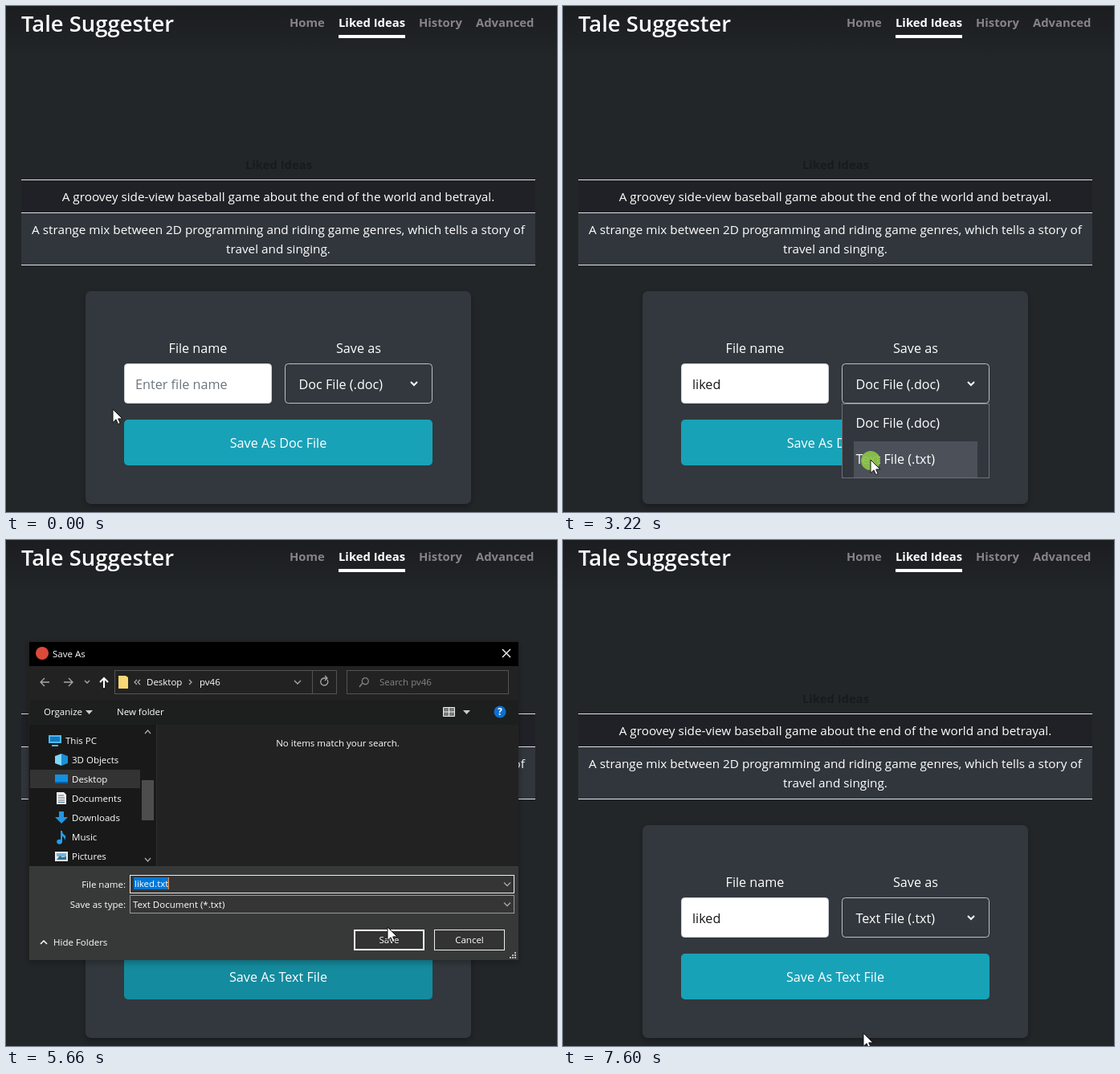
Write an HTML page that moves like this. It is 686 px wide and 630 px high and loops after 8.5 s.

```html
<!DOCTYPE html>
<html lang="en">
<head>
<meta charset="utf-8">
<title>Save liked ideas</title>
<style>
  html, body { margin: 0; width: 100%; height: 100%; overflow: hidden; background: #222629; }
  svg { display: block; width: 100%; height: 100%; }
  text { font: 15.3px "Open Sans", "Noto Sans", sans-serif; fill: #fff; white-space: pre; }
  .mid { text-anchor: middle; }
  .bold { font-size: 14.8px; font-weight: 700; }
  .nav { fill: #87828b; }
  .form { font-size: 16.2px; }
  #dialog text { font-size: 11.5px; }
  #dialog .dim { fill: #858585; }
  .line { fill: none; stroke: #fff; stroke-width: 2; }
  .thin { fill: none; stroke: #a8a8a8; stroke-width: 1.3; }
  .box { fill: none; stroke: #535353; }
</style>
</head>
<body>
<svg viewBox="0 0 686 630">
  <defs>
    <linearGradient id="head" x2="0" y2="1">
      <stop stop-color="#1b1d20"/><stop offset="1" stop-color="#222629"/>
    </linearGradient>
    <filter id="soft" x="-10%" y="-10%" width="120%" height="120%">
      <feDropShadow dx="0" dy="3" stdDeviation="4" flood-opacity=".3"/>
    </filter>
  </defs>

  <rect width="686" height="630" fill="#222629"/>
  <rect width="686" height="66" fill="url(#head)"/>
  <text x="19" y="32" style="font-size:27.4px;font-weight:600">Tale Suggester</text>
  <text class="bold nav" x="353" y="26">Home</text>
  <text class="bold" x="414" y="26">Liked Ideas</text>
  <text class="bold nav" x="514" y="26">History</text>
  <text class="bold nav" x="585" y="26">Advanced</text>
  <rect x="414" y="36" width="83" height="4" fill="#fff"/>

  <text class="bold mid" x="339.5" y="203" style="fill:#181b1e">Liked Ideas</text>
  <rect x="19" y="217" width="640" height="40" fill="#202126"/>
  <rect x="19" y="258" width="640" height="64" fill="#31363c"/>
  <path d="M19 216.5h640M19 257.5h640M19 322.5h640" stroke="#dee2e6"/>
  <text class="mid" x="339" y="243">A groovey side-view baseball game about the end of the world and betrayal.</text>
  <text class="mid" x="339" y="284">A strange mix between 2D programming and riding game genres, which tells a story of</text>
  <text class="mid" x="339" y="308">travel and singing.</text>

  <rect x="99" y="355" width="480" height="265" rx="7" fill="#32373d" filter="url(#soft)"/>
  <text class="mid form" x="239" y="432">File name</text>
  <text class="mid form" x="439" y="432">Save as</text>
  <rect x="147.5" y="445.5" width="183" height="49" rx="4" fill="#fff" stroke="#ced4da"/>
  <text id="name" class="form" x="161" y="477"></text>
  <rect id="caret" y="459" width="1" height="22" fill="#111"/>
  <rect x="347.5" y="445.5" width="183" height="49" rx="4" fill="none" stroke="#bcbfc3"/>
  <text id="kind" class="form" x="364.5" y="477"></text>
  <path class="line" d="M504 468l4 4 4-4"/>
  <rect id="button" x="147" y="515" width="384" height="57" rx="5"/>
  <text id="label" class="mid form" x="339" y="550"></text>

  <g id="popup">
    <rect x="347.5" y="495.5" width="183" height="92" fill="#32373d" stroke="#6b7078"/>
    <rect id="mark" x="362" width="154" height="45" fill="#4b5059"/>
    <text class="form" x="364.5" y="525">Doc File (.doc)</text>
    <text class="form" x="364.5" y="570">Text File (.txt)</text>
  </g>

  <g id="dialog">
    <rect x="28" y="126" width="610" height="397" fill="#202121" filter="url(#soft)"/>
    <rect x="29" y="127" width="609" height="30" fill="#000"/>
    <circle cx="45" cy="141" r="8" fill="#db4a3a"/>
    <text x="58" y="146">Save As</text>
    <path class="line" style="stroke-width:1.3" d="M618 136l10 10m0-10l-10 10"/>

    <path class="thin" d="M54 177H43m5-5l-5 5 5 5M72 177h11m-5-5l5 5-5 5M98 175l3 3 3-3M359 175l4 4 4-4"/>
    <path class="line" d="M122 184v-12m-5 5l5-5 5 5"/>
    <rect class="box" x="135.5" y="162.5" width="276" height="29"/>
    <path class="box" d="M381.5 163v28"/>
    <path d="M140 169h9l3 2v14h-12z" fill="#f8d775"/>
    <path class="thin" d="M163 174l-3 3 3 3m4-6l-3 3 3 3M228 174l3 3-3 3M400 174a4.5 4.5 0 1 1-4-2h3m-2-3l3 3-3 3"/>
    <text x="175" y="181">Desktop</text>
    <text x="241" y="181">pv46</text>
    <rect class="box" x="424.5" y="162.5" width="201" height="29"/>
    <path class="thin" style="stroke:#858585" d="M440 183l4-5a4 4 0 1 1 2 1.5l-2-1.5"/>
    <text class="dim" x="465" y="181">Search pv46</text>

    <rect x="29" y="199" width="609" height="31" fill="#1d1f1f"/>
    <g id="tools">
      <text x="47" y="218">Organize</text>
      <text x="138" y="218">New folder</text>
      <path d="M99 212h9l-4.5 5zM569 212h9l-4.5 5z" fill="#ccc"/>
      <path d="M544.5 208.5h14v11h-14zM551.5 208v12M544 214h15" fill="#777" stroke="#eee"/>
    </g>
    <circle cx="615" cy="214" r="7.5" fill="#0f6fd0"/>
    <text class="mid" x="615" y="218" style="font-weight:700">?</text>

    <rect x="29" y="230" width="158" height="176" fill="#191919"/>
    <path d="M187.5 230v176" stroke="#2d2d2d"/>
    <rect x="30" y="286" width="137" height="23" fill="#333"/>
    <rect x="169" y="299" width="15" height="50" fill="#4d4d4d"/>
    <path class="thin" d="M173 241l3.5-4 3.5 4M173 396l3.5 4 3.5-4"/>
    <g id="places"></g>
    <path d="M53 243h16v10H53zM57 255h8v2h-8z" fill="#4fb9ee"/>
    <path d="M55 245h12v6H55z" fill="#1679c4"/>
    <path d="M61 269l8-3v15l-8-3z" fill="#7fd6f5"/>
    <path d="M69 266l8 3v9l-8 3z" fill="#1c8fd6"/>
    <path d="M61 292h16v11H61z" fill="#1490e0"/>
    <path d="M61 301h16v2H61z" fill="#0b5ea8"/>
    <path d="M63 314h9l3 3v12H63z" fill="#eee"/>
    <path d="M65 318h7m-7 3h8m-8 3h8m-8 2.5h8" stroke="#58748c"/>
    <path d="M66 338h6v7h5l-8 8-8-8h5z" fill="#2196e3"/>
    <path d="M68 362h2q0 4 4 6 1 3-1 6 0-4-3-5v6a3.5 3 0 1 1-2-2z" fill="#239cec"/>
    <path d="M61 388h16v12H61z" fill="#eee"/>
    <path d="M63 390h12v4H63z" fill="#68b8e8"/>
    <path d="M63 398l4-5 3 2 5-1v4z" fill="#386f8e"/>
    <text class="mid" x="413" y="257">No items match your search.</text>

    <rect x="29" y="406" width="609" height="117" fill="#373938"/>
    <text x="149" y="433" text-anchor="end">File name:</text>
    <text x="149" y="458" text-anchor="end">Save as type:</text>
    <rect x="154.5" y="417.5" width="478" height="22" fill="#353535" stroke="#eee"/>
    <rect x="154.5" y="442.5" width="478" height="22" fill="#353535" stroke="#999"/>
    <rect id="picked" x="159" y="420" width="43" height="15" fill="#0078d7"/>
    <text x="160" y="432">liked.txt</text>
    <rect id="bar" x="202" y="420" width="1" height="15" fill="#ff8728"/>
    <text x="158" y="458">Text Document (*.txt)</text>
    <path class="thin" d="M620 426.5l4 4 4-4M620 451.5l4 4 4-4"/>
    <path class="line" style="stroke-width:1.5" d="M43 503l4-4 4 4"/>
    <text x="59" y="505">Hide Folders</text>
    <rect id="save" x="434" y="486" width="86" height="24" stroke="#fff" stroke-width="2"/>
    <text class="mid" x="477" y="502">Save</text>
    <rect x="533.5" y="485.5" width="87" height="25" fill="#333" stroke="#eee"/>
    <text class="mid" x="577" y="502">Cancel</text>
    <path d="M627 520h8M630 517h5M633 514h2" stroke="#bbb" stroke-width="2" stroke-dasharray="2 1"/>
  </g>

  <g id="pointer">
    <circle id="click" r="12" fill="#8bc34a" opacity=".92"/>
    <path id="arrow" d="M0-1V15.5l4-3.7 2.5 5.8 2.7-1.2-2.5-5.5h5.3z" fill="#fff" stroke="#111"/>
    <path id="hand" d="M-1.5 12V3q0-2 1.7-2T2 3v6l1-1.5q2.5-.5 2.7 1.5 2.5-.7 2.8 1.2 2.3 0 2.3 2v4.5L9 22H1l-5.5-7q-1.5-2.5 0-3z" fill="#fff" stroke="#111"/>
    <path id="beam" d="M-3-8h2.5L0-7.5.5-8H3M0-7.5v15M-3 8h2.5L0 7.5.5 8H3" fill="none" stroke="#222"/>
  </g>
</svg>
<script>
const LOOP = 8500;
const $ = id => document.getElementById(id);
const show = (id, on) => $(id).style.display = on ? '' : 'none';
const within = (t, a, b) => t >= a && t < b;
const blink = (t, since) => (t - since) % 1000 < 500;

const places = ['This PC', '3D Objects', 'Desktop', 'Documents', 'Downloads', 'Music', 'Pictures'];
$('places').innerHTML = places.map((name, i) =>
  `<text x="${i ? 82 : 74}" y="${254 + 24 * i}">${name}</text>`).join('');

// Pointer moves: start, end, steps, target, optional control point
const START = [133, 503];
const moves = [
  [100, 190, 2, [186, 475]],
  [2100, 2520, 5, [396, 467]],
  [3020, 3220, 3, [383, 566]],
  [3520, 3940, 5, [347, 538]],
  [5360, 5660, 4, [475, 483]],
  [5760, 5860, 2, [475, 500]],
  [6980, 7600, 7, [374, 615], [600, 540]]
];
const keys = [1090, 1290, 1400, 1500, 1600];
const clicks = [[390, 490], [2620, 2720], [3220, 3420], [4140, 4240], [5960, 6160]];

function pointerAt(t) {
  let p = START;
  for (const [a, b, n, to, via] of moves) {
    if (t < a) break;
    const k = Math.min(n, Math.floor((t - a) / (b - a) * (n - 1) + 1e-6) + 1) / n;
    const s = via ? k : k * k * (3 - 2 * k);
    const from = p;
    p = to.map((v, i) => {
      const c = via ? via[i] : (from[i] + v) / 2;
      return (1 - s) ** 2 * from[i] + 2 * s * (1 - s) * c + s * s * v;
    });
  }
  return p;
}

function draw(t) {
  const [x, y] = pointerAt(t);
  const open = within(t, 4540, 6380);
  const list = within(t, 2720, 3420);
  const over = (l, top, r, b) => x >= l && x < r && y >= top && y < b;
  const inField = !open && over(147, 445, 331, 495);
  const inButton = !open && !list && over(147, 515, 531, 572);

  // Page form
  const typed = keys.filter(k => t >= k).length;
  const name = $('name');
  name.textContent = typed ? 'liked'.slice(0, typed) : 'Enter file name';
  name.style.fill = typed ? '#16181a' : '#6c757d';
  $('caret').setAttribute('x', 161 + (typed ? name.getComputedTextLength() : 0));
  show('caret', within(t, 390, 2600) && blink(t, typed ? keys[typed - 1] : 390));
  const kind = t < 3420 ? 'Doc' : 'Text';
  $('kind').textContent = kind === 'Doc' ? 'Doc File (.doc)' : 'Text File (.txt)';
  $('label').textContent = `Save As ${kind} File`;
  $('button').setAttribute('fill', inButton || within(t, 3940, 6980) ? '#148b9e' : '#18a2b8');
  show('popup', list);
  $('mark').setAttribute('y', y < 542 ? 497 : 542);

  // Save dialog
  show('dialog', open);
  $('dialog').style.opacity = t < 6280 ? 1 : .35;
  show('tools', t >= 4740);
  show('picked', t < 6060);
  show('bar', t < 6060 && blink(t, 3660));
  $('save').setAttribute('fill', over(433, 486, 521, 511) ? '#484848' : '#333');

  // Pointer
  $('pointer').setAttribute('transform', `translate(${x} ${y})`);
  show('pointer', !within(t, 1090, 2100));
  show('click', clicks.some(([a, b]) => within(t, a, b)));
  show('beam', inField);
  show('hand', inButton);
  show('arrow', !inField && !inButton);
}

const begin = performance.now();
function tick() {
  draw((performance.now() - begin) % LOOP);
  requestAnimationFrame(tick);
}
tick();
</script>
</body>
</html>
```
